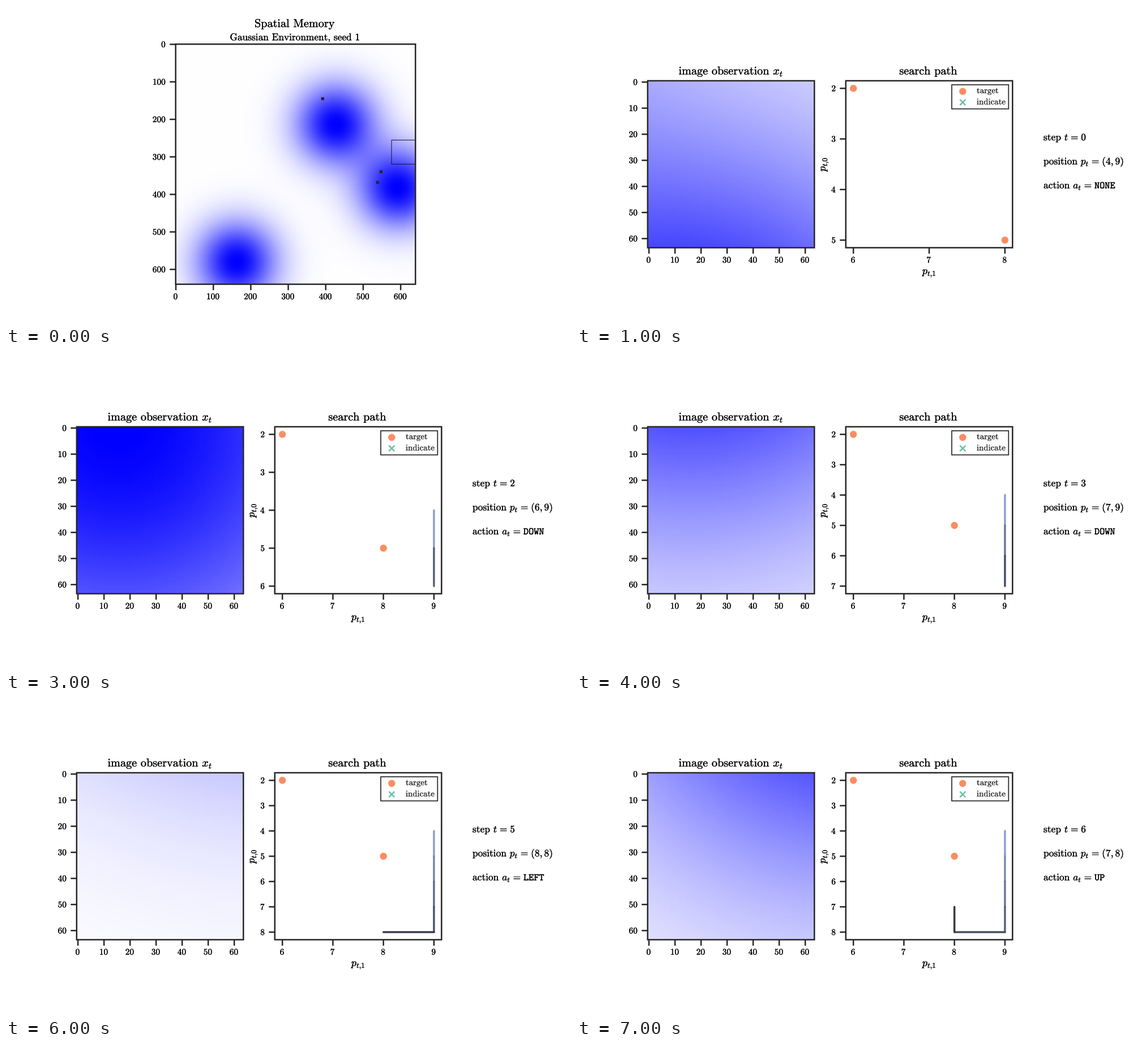
Recreate the animation shown at these times as a matplotlib script. Size 998x561 px, loop 8000 ms.

```python
import numpy as np
import matplotlib.pyplot as plt
from matplotlib.animation import FuncAnimation
from matplotlib.patches import Circle, Rectangle
from matplotlib.patheffects import withStroke

W, H, DPI = 998, 561, 64
PT = 72 / DPI  # points per pixel

INK = "#262626"
ORANGE, GREEN = "#fc8d62", "#66c2a5"
PATH_LIGHT = np.array([141, 160, 203]) / 255
PATH_DARK = np.array([35, 37, 42]) / 255

SIZE, CELL, SIGMA = 640, 64, 74
BLOBS = [(426, 213), (592, 383), (162, 580)]
TARGETS = [(2, 6), (5, 8)]
START = (4, 9)
MOVES = {"DOWN": (1, 0), "LEFT": (0, -1), "UP": (-1, 0)}
ACTIONS = ["DOWN"] * 4 + ["LEFT", "UP"]

plt.rcParams["mathtext.fontset"] = "cm"


def make_world():
    y, x = np.mgrid[:SIZE, :SIZE]
    g = sum(np.exp(-((x - cx) ** 2 + (y - cy) ** 2) / (2 * SIGMA ** 2))
            for cx, cy in BLOBS)
    fade = 1 - np.clip(g, 0, 1)
    return np.dstack([fade, fade, np.ones_like(fade)])


def walk():
    path = [START]
    for name in ACTIONS:
        dr, dc = MOVES[name]
        path.append((path[-1][0] + dr, path[-1][1] + dc))
    return path


WORLD = make_world()
PATH = walk()

fig = plt.figure(figsize=(W / DPI, H / DPI), dpi=DPI, facecolor="white")
ax = fig.add_axes([0, 0, 1, 1])


def rm(s):
    """Roman text with a normal word space, for use inside $...$."""
    s = s.replace(",", "{,}").replace(" ", r"\hspace{0.38}")
    return r"\mathrm{" + s + "}"


def equals(left, right):
    return left + r"\hspace{0.116}=\hspace{0.116}" + right


def write(x, y, s, size, ha="left", color="black", weight=0.25, **kw):
    """Text drawn as outlines, thickened by a stroke of `weight` pixels."""
    kw.setdefault("va", "baseline")
    ax.text(x, y, f"${s}$", fontsize=size * PT, ha=ha, color=color,
            path_effects=[withStroke(linewidth=weight * PT, foreground=color)], **kw)


def line(xs, ys, width, color=INK, cap="butt", z=4):
    ax.plot(xs, ys, color=color, lw=width * PT, solid_capstyle=cap,
            zorder=z, snap=False)


def box(x, y, w, h, width, face="none", edge=INK, z=5):
    ax.add_patch(Rectangle((x, y), w, h, lw=width * PT, fc=face, ec=edge,
                           joinstyle="miter", zorder=z, snap=False))


def dot(x, y, z=3):
    ax.add_patch(Circle((x, y), 6.2, fc=ORANGE, lw=0, zorder=z))


def frame_axes(left, top, side, xticks, yticks):
    """Square frame; ticks map a label to its pixel position."""
    bottom = top + side
    box(left, top, side, side, 2.5)
    for label, x in xticks.items():
        line([x, x], [bottom, bottom + 10.5], 2.5)
        write(x, bottom + 26.4, rm(str(label)), 15.3, "center")
    for label, y in yticks.items():
        line([left - 10.5, left], [y, y], 2.5)
        write(left - 16.5, y + 5, rm(str(label)), 15.3, "right")


def image_axes(pixels, left, top, side, step):
    n = len(pixels)
    ax.imshow(pixels, extent=(left, left + side, top + side, top),
              aspect="auto", zorder=1)
    ticks = range(0, n, step)
    place = lambda origin: {v: origin + (v + 0.5) * side / n for v in ticks}
    frame_axes(left, top, side, place(left), place(top))


def draw_overview():
    image_axes(WORLD, 299.7, 67.3, 423.55, 100)
    write(510.5, 37.2, rm("Spatial Memory"), 20.2, "center")
    write(510.5, 60.5, rm("Gaussian Environment, seed 1"), 17.3, "center")
    for x, y in [(559.3, 163.5), (662.3, 292.5), (656.5, 311.2)]:
        box(x - 2.6, y - 2.6, 5.2, 5.2, 0, face=INK, z=3)
    box(681, 236.5, 42.5, 42.5, 1, edge="#111133", z=3)


def draw_legend():
    box(662, 139, 100.3, 42.5, 1.7, face="white", z=6)
    dot(681.3, 150.7, z=7)
    for s in (-1, 1):
        line([676.3, 686.3], [170 - 5 * s, 170 + 5 * s], 2.5, GREEN, z=7)
    for y, label in [(153.8, "target"), (173.6, "indicate")]:
        write(706, y, rm(label), 14.8, color=INK, weight=0.1, zorder=8)


def draw_search(t):
    left, top, side = 474.8, 131.9, 294.5
    shown = TARGETS + (PATH[:t + 1] if t else [])
    rows, cols = zip(*shown)

    def scale(values, origin):
        lo, hi = min(values), max(values)
        return lambda v: origin + side * (0.05 + (v - lo) / (hi - lo)) / 1.1

    sx, sy = scale(cols, left), scale(rows, top)
    ticks = lambda values, f: {v: f(v) for v in range(min(values), max(values) + 1)}
    frame_axes(left, top, side, ticks(cols, sx), ticks(rows, sy))

    for r, c in TARGETS:
        dot(sx(c), sy(r))
    for i in range(t):
        (r0, c0), (r1, c1) = PATH[i], PATH[i + 1]
        color = PATH_LIGHT + (PATH_DARK - PATH_LIGHT) * i / t
        line([sx(c0), sx(c1)], [sy(r0), sy(r1)], 3.5, color, "round", z=3 + i / 10)

    write(621.2, 120.9, rm("search path"), 20.2, "center")
    write(622.5, 473, "p_{t{,}1}", 18.4, "center")
    write(437.7, 279, "p_{t{,}0}", 18.4, "center", va="center", rotation=90)
    draw_legend()


def draw_step(t):
    row, col = PATH[t]
    view = WORLD[row * CELL:(row + 1) * CELL, col * CELL:(col + 1) * CELL]
    image_axes(view, 124.8, 131.9, 294.5, 10)
    write(272, 120.9, rm("image observation ") + "x_t", 20.2, "center")
    draw_search(t)

    action = ACTIONS[t - 1] if t else "NONE"
    write(824, 237, equals(rm("step ") + "t", str(t)), 17.4)
    write(824, 279.3, equals(rm("position ") + "p_t", f"({row},{col})"), 17.4)
    write(824, 321.6, equals(rm("action ") + "a_t", r"\mathtt{" + action + "}"), 17.4)


def update(i):
    ax.clear()
    ax.set_axis_off()
    if i == 0:
        draw_overview()
    else:
        draw_step(i - 1)
    ax.set_xlim(0, W)
    ax.set_ylim(H, 0)
    return []


anim = FuncAnimation(fig, update, frames=len(PATH) + 1, interval=1000,
                     init_func=lambda: update(0), repeat=True, repeat_delay=0)
plt.show()
```
